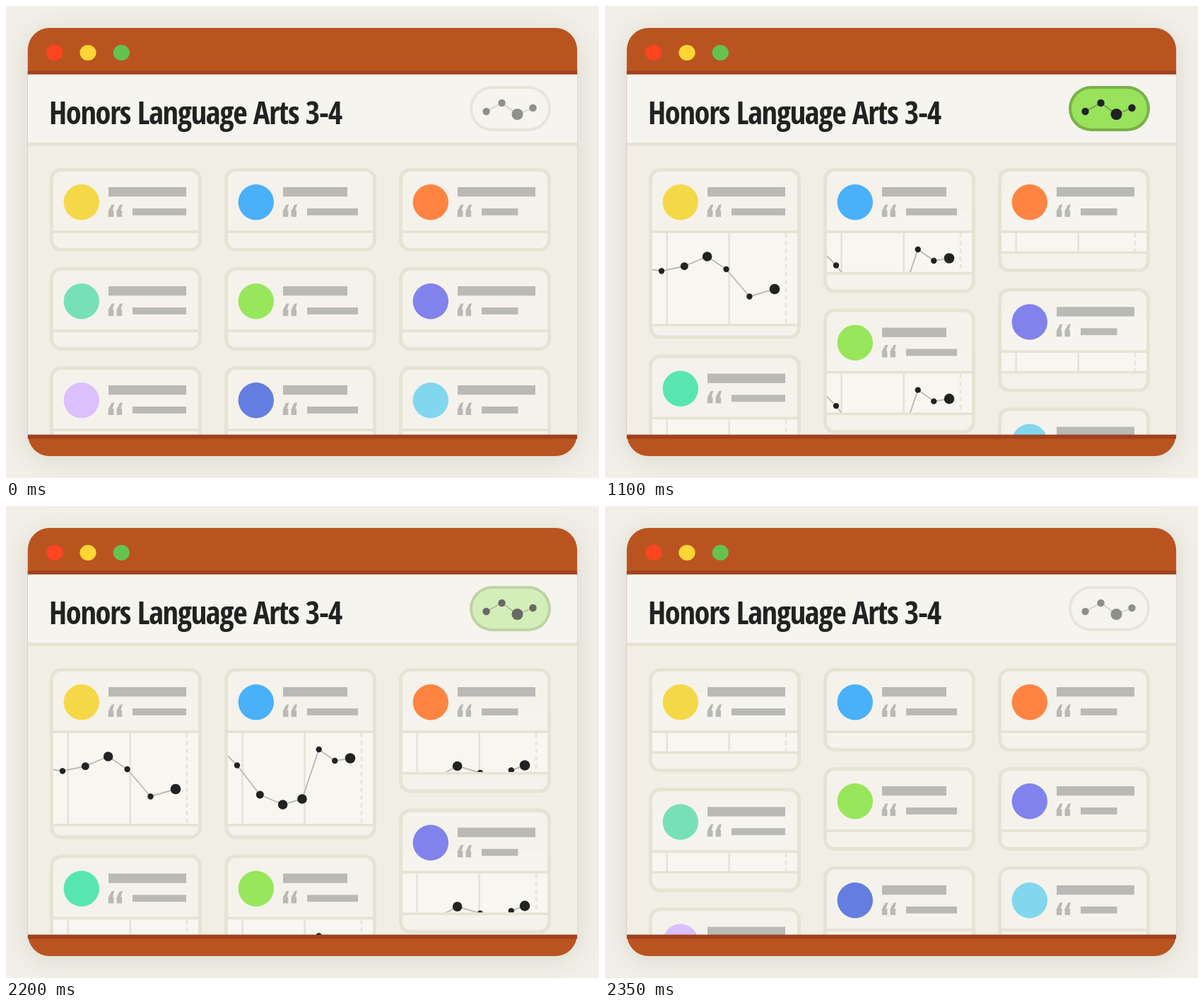
An HTML page with a canvas for the animation above (2.4 s loop, 839 px wide and 667 px high).

```html
<!DOCTYPE html>
<html lang="en">
<head>
<meta charset="utf-8">
<title>Class cards</title>
<style>
  html, body { margin: 0; width: 100%; height: 100%; overflow: hidden; background: #f2efe8; }
  canvas { display: block; width: 839px; height: 667px; }
</style>
</head>
<body>
<canvas id="stage"></canvas>
<script>
const W = 839, H = 667, LOOP = 2400, STEP = 50;
const canvas = document.getElementById('stage');
const ctx = canvas.getContext('2d');
const dpr = window.devicePixelRatio || 1;
canvas.width = Math.round(W * dpr);
canvas.height = Math.round(H * dpr);

const EDGE = '#e6e3d5', CARD = '#f5f2eb', PAPER = '#f7f6f1', GREY = '#b9b9b5', INK = '#222222';
const ORANGE = '#b95421', RUST = '#a0411c', TEAL = '#78e0b8', MINT = '#57e6b2';
const LEFT = 30.8, WIDE = 777.3, OPEN = 3;

// levels: chart heights from the card's top; pace: how the later dots bunch up
const columns = [
  { bar: 110, line: 76, colors: ['#f5d847', TEAL, '#dcbfff'],
    levels: [140.5, 145.5, 138.7, 125, 143, 181.5, 171], pace: 1.15, accent: 2 },
  { bar: 91, line: 72, colors: ['#49b0f9', '#98e65c', '#647de0'],
    levels: [105, 137.5, 179, 193, 185, 115, 131, 127.5], pace: 0.9, accent: 3 },
  { bar: 110, line: 51.5, colors: ['#ff8442', '#8282ed', '#82d7ee'],
    levels: [177, 163, 156, 138.5, 148, 174, 144.5, 137.5], pace: 0.78, accent: 4 }
];

// Even steps for the first dots, then a power curve up to the last one
function chartPoints({ levels, pace, accent }) {
  const last = levels.length - 2;
  return levels.map((y, i) => {
    const k = i - 1;
    const x = k < 3 ? 18 + 32.3 * k : 82.6 + 95.4 * ((k - 2) / (last - 2)) ** pace;
    const r = k === last ? 7.3 : k === accent ? 6.8 : k < 3 ? 4.2 + 1.3 * k : 4.2;
    return [x, y, Math.max(r, 0)];
  });
}
for (const col of columns) col.points = chartPoints(col);

const buttonPoints = [149, 137, 153, 144].map((y, k) => [679.5 + 22 * k, y, k === 2 ? 8 : 5.2]);

function rect(x, y, w, h, color) {
  ctx.fillStyle = color;
  ctx.fillRect(x, y, w, h);
}

function round(x, y, w, h, r, color) {
  ctx.beginPath();
  ctx.roundRect(x, y, w, h, r);
  ctx.fillStyle = color;
  ctx.fill();
}

function oval(x, y, rx, ry, color) {
  ctx.beginPath();
  ctx.ellipse(x, y, rx, ry, 0, 0, Math.PI * 2);
  ctx.fillStyle = color;
  ctx.fill();
}

function graph(points, width, lineColor, dotColor) {
  ctx.beginPath();
  for (const [x, y] of points) ctx.lineTo(x, y);
  ctx.lineWidth = width;
  ctx.lineJoin = 'round';
  ctx.strokeStyle = lineColor;
  ctx.stroke();
  for (const [x, y, r] of points) oval(x, y, r, r, dotColor);
}

function mix(from, to, t) {
  return 'rgb(' + from.map((v, i) => Math.round(v + (to[i] - v) * t)).join(',') + ')';
}

// Narrowest installed face, tightly tracked, sized to the heading's line
const TITLE = 'Honors Language Arts 3-4', TRACK = -1.3;
function pickTitleFont() {
  const faces = ['"Noto Sans"', '"Open Sans"', '"Open Sans Condensed"', '"Roboto Condensed"', 'Roboto'];
  const font = (face, size) => `600 extra-condensed ${size}px ${face}, sans-serif`;
  const widths = faces.map(face => {
    ctx.font = font(face, 49);
    return ctx.measureText(TITLE).width;
  });
  const width = Math.min(...widths);
  const size = Math.min(49, 49 * (414 - TRACK * TITLE.length) / width);
  return font(faces[widths.indexOf(width)], size.toFixed(1));
}
const titleFont = pickTitleFont();

function title() {
  ctx.font = titleFont;
  ctx.letterSpacing = TRACK + 'px';
  ctx.fillStyle = INK;
  ctx.fillText(TITLE, 61, 166.7);
}

function quoteMark(x, y) {
  ctx.beginPath();
  ctx.moveTo(x, y + 18);
  ctx.lineTo(x, y + 9.5);
  ctx.lineTo(x + 4.5, y + 1);
  ctx.lineTo(x + 8.5, y);
  ctx.lineTo(x + 6, y + 9);
  ctx.lineTo(x + 7.6, y + 9);
  ctx.lineTo(x + 7.6, y + 18);
  ctx.fillStyle = GREY;
  ctx.fill();
}

function chart(col, height) {
  ctx.save();
  ctx.beginPath();
  ctx.rect(5, 92, 205, height);
  ctx.clip();
  rect(5, 92, 205, height, PAPER);
  for (const x of [24.3, 112.3]) rect(x, 92, 2.7, height, EDGE);
  for (let y = 92; y < 92 + height; y += 11) rect(192.7, y, 2.6, 6, EDGE);
  graph(col.points, 1.9, '#bbbab6', INK);
  ctx.restore();
  rect(5, 92 + height, 205, 3.6, EDGE);
}

function card(col, index, row, pose) {
  const open = pose === OPEN;
  const grow = open ? 123.5 : 29.3 * pose;
  ctx.save();
  ctx.translate(62 + 247 * index, 229 + row * (140 + grow));
  round(0, 0, 215, 118 + grow, 16, EDGE);
  round(5, 5, 205, 108 + grow, 11.5, CARD);

  // Top of the chart sheet showing while it slides
  if (pose && !open) {
    const top = 8 + 27 * pose;
    round(6, top, 203, 88 - top, [10, 10, 0, 0], '#f6f4ef');
  }

  const color = col.colors[row];
  oval(44.8, 48.2, 25.2, 25.2, open && color === TEAL ? MINT : color);
  rect(83, 27, col.bar, 13.3, GREY);
  rect(117, 57, col.line, 9.8, GREY);
  for (const x of [82.8, 94.5]) quoteMark(x, 51);
  rect(5, 88, 205, 4, EDGE);
  if (pose) chart(col, open ? grow + 4.5 : grow - 3.7);
  ctx.restore();
}

function button(on) {
  round(656, 113, 115, 64, 32, mix([232, 229, 217], [121, 176, 75], on));
  round(660, 117, 107, 56, 28, mix([246, 244, 239], [152, 226, 92], on));
  graph(buttonPoints, 1.8, mix([211, 210, 203], [111, 160, 70], on),
        mix([143, 143, 139], [34, 34, 34], on));
}

// step counts how far the columns have opened, one column behind the other
function poseAt(t) {
  if (t < 1000) return { step: 0, on: 0 };
  if (t < 2200) {
    const step = Math.min(5, 1 + Math.floor((t - 1000) / STEP));
    return { step, on: step === 1 ? 0.46 : 1 };
  }
  const step = 4 - Math.floor((t - 2200) / STEP);
  return { step, on: step === 4 ? 0.36 : 0 };
}

function draw(t) {
  const { step, on } = poseAt(t);
  ctx.setTransform(dpr, 0, 0, dpr, 0, 0);
  rect(0, 0, W, H, '#f2efe8');

  ctx.save();
  ctx.shadowColor = 'rgba(60, 55, 40, 0.12)';
  ctx.shadowBlur = 36 * dpr;
  ctx.shadowOffsetY = 5 * dpr;
  round(LEFT, 31, WIDE, 605, 31, ORANGE);
  ctx.restore();

  rect(LEFT, 91.7, WIDE, 5.3, RUST);
  rect(LEFT, 96.7, WIDE, 97, '#f5f4ef');
  rect(LEFT, 193, WIDE, 5, EDGE);
  rect(LEFT, 198, WIDE, 408, '#f1eee5');

  ['#ff4420', '#ffd633', '#66c24f'].forEach((color, i) =>
    oval(68.7 + 47.3 * i, 66, 11.6, 11, color));
  title();
  button(on);

  ctx.save();
  ctx.beginPath();
  ctx.rect(LEFT, 198, WIDE, 408);
  ctx.clip();
  columns.forEach((col, index) => {
    const pose = Math.max(0, Math.min(OPEN, step - index));
    for (let row = 0; row < 3; row++) card(col, index, row, pose);
  });
  ctx.restore();
  rect(LEFT, 605.7, WIDE, 5.8, RUST);
}

const start = performance.now();
function tick() {
  draw((performance.now() - start) % LOOP);
  requestAnimationFrame(tick);
}
tick();
</script>
</body>
</html>
```
